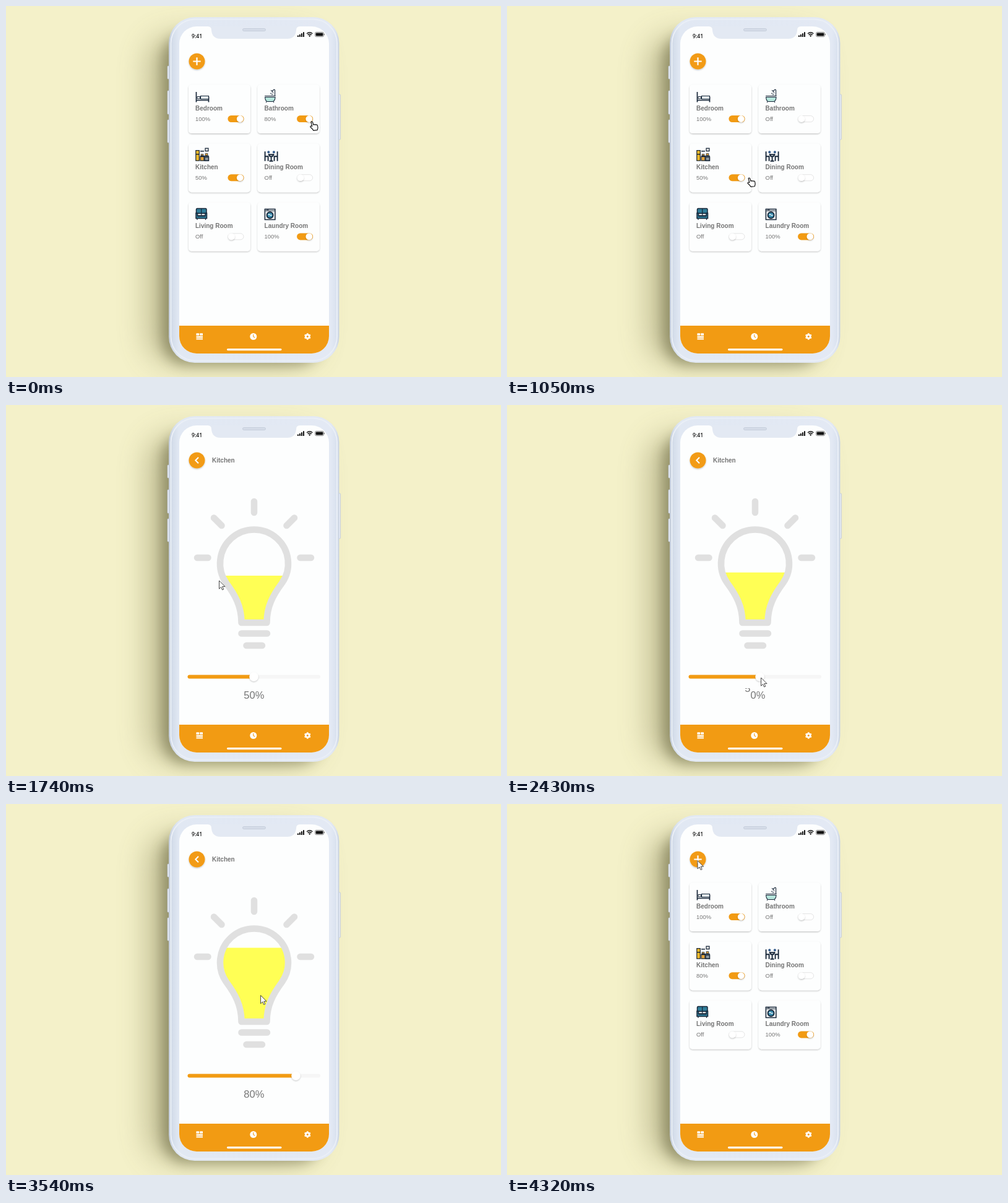
These frames come from a looping animation (800 by 600 pixels, 4350 ms). An HTML page:

```html
<!DOCTYPE html>
<html lang="en">
<head>
<meta charset="utf-8">
<title>Smart lighting</title>
<style>
  html, body { margin: 0; width: 100%; height: 100%; overflow: hidden; background: #f4f1c9; }
  svg { display: block; width: 800px; height: 600px; }
  text { font-family: "Liberation Sans", Arial, sans-serif; fill: #757575; }
  .title { font-size: 10px; font-weight: bold; }
  .value { font-size: 9.4px; }
  .big { font-size: 16.5px; }
</style>
</head>
<body>
<svg id="stage" viewBox="0 0 800 600" xmlns="http://www.w3.org/2000/svg">
  <defs>
    <linearGradient id="body">
      <stop offset="0" stop-color="#c3ccda"/><stop offset=".025" stop-color="#d5deeb"/>
      <stop offset=".06" stop-color="#e1e8f3"/><stop offset=".95" stop-color="#e3e9f4"/>
      <stop offset=".98" stop-color="#dbe3f0"/><stop offset="1" stop-color="#cbd4e2"/>
    </linearGradient>
    <filter id="wide" x="-50%" y="-20%" width="200%" height="140%"><feGaussianBlur stdDeviation="25"/></filter>
    <filter id="near" x="-50%" y="-20%" width="200%" height="140%"><feGaussianBlur stdDeviation="10"/></filter>
    <filter id="lift" x="-30%" y="-30%" width="160%" height="170%">
      <feDropShadow dx="0" dy="1.2" stdDeviation="1.3" flood-color="#000" flood-opacity=".24"/>
    </filter>
    <clipPath id="screenClip"><rect x="280" y="33" width="242" height="529" rx="28"/></clipPath>
    <clipPath id="digitClip"><rect x="380" y="458" width="16" height="23"/></clipPath>
    <path id="bulbShape" d="M380.5 352C380.5 325 370 307 356 288A55 55 0 1 1 446 288C432 307 421.500 325 421.500 352Z"/>
    <clipPath id="bulbClip"><use href="#bulbShape"/></clipPath>
  </defs>

  <rect width="800" height="600" fill="#f4f1c9"/>
  <rect x="230" y="50" width="270" height="525" rx="40" fill="#6f6c40" opacity=".42" filter="url(#wide)"/>
  <rect x="252" y="45" width="260" height="536" rx="40" fill="#55532f" opacity=".42" filter="url(#near)"/>

  <g fill="#e6ebf4" stroke="#b9c2d0" stroke-width=".7">
    <rect x="261" y="97" width="4" height="21" rx="1"/>
    <rect x="261" y="137" width="4" height="38" rx="1"/>
    <rect x="261" y="184" width="4" height="37" rx="1"/>
    <rect x="537" y="143" width="3.500" height="73" rx="1"/>
  </g>
  <rect x="263" y="18" width="275.500" height="559" rx="42" fill="url(#body)"/>
  <rect x="266.500" y="21.500" width="268.500" height="552" rx="39" fill="none" stroke="#eaeff7" stroke-width="2"/>
  <rect x="280" y="33" width="242" height="529" rx="28" fill="#fdfefe"/>
  <path d="M326 33Q332 33 332 39Q333 53 347 53H454Q468 53 469 39Q469 33 475 33Z" fill="#e3e9f3"/>
  <rect x="382.500" y="36.500" width="37" height="4" rx="2" fill="#d5dce8" stroke="#c0c9d7" stroke-width=".8"/>

  <text x="300" y="52" style="font:600 8.600px 'Open Sans','Noto Sans',sans-serif;fill:#111">9:41</text>
  <g fill="#111">
    <path d="M471 47.500h2v2.500h-2zM474 46h2v4h-2zM477 44.200h2v5.800h-2zM480 42.300h2v7.700h-2z"/>
    <rect x="500.600" y="43.500" width="11.800" height="5" rx="1"/>
    <rect x="499.500" y="42.300" width="14" height="7.400" rx="2" fill="none" stroke="#777" stroke-width=".8"/>
    <path d="M514 44.500q1.500 1.500 0 3z"/>
    <path d="M490.700 50l-1.700-1.900a2.600 2.600 0 0 1 3.400 0z"/>
    <path d="M486 44.700q4.700-3.900 9.400 0M487.600 46.700q3.100-2.500 6.200 0" fill="none" stroke="#111" stroke-width="1.400"/>
  </g>

  <circle cx="308.500" cy="89.500" r="13" fill="#f29b13" filter="url(#lift)"/>

  <g id="home">
    <path d="M308.500 83.300v12.400M302.300 89.500h12.400" stroke="#fff" stroke-width="2.200"/>
    <g id="cards"></g>
  </g>

  <g id="detail">
    <path d="M311 84.800l-4.700 4.700 4.700 4.700" fill="none" stroke="#fff" stroke-width="2"/>
    <text class="title" x="333" y="93">Kitchen</text>
    <rect id="liquid" x="340" width="122" fill="#ffff55" clip-path="url(#bulbClip)"/>
    <g fill="none" stroke="#e0e0e0" stroke-width="10.500" stroke-linecap="round" stroke-linejoin="round">
      <use href="#bulbShape"/>
      <path d="M380.500 369.500H422M388.500 389H414M401 156v18M336 182.500l12.500 12.500M466 182.500l-12.500 12.500M309 247h17.500M475.500 247H493"/>
    </g>
    <g stroke-width="6" stroke-linecap="round">
      <path d="M297 439.500H505" stroke="#f6f6f6"/>
      <path id="level" stroke="#f29b13"/>
    </g>
    <circle id="thumb" cy="439.500" r="7.200" fill="#fff" filter="url(#lift)"/>
    <g clip-path="url(#digitClip)"><g id="digits" class="big"></g></g>
    <text class="big" x="393.500" y="475">0%</text>
  </g>

  <g clip-path="url(#screenClip)"><rect x="280" y="517" width="242" height="45" fill="#f29b13"/></g>
  <g fill="#fff">
    <rect x="357" y="554" width="88.500" height="3.200" rx="1.600"/>
    <path d="M307.500 529.300h4.600v3.700h-4.600zM313.200 529.300h4.800v3.700h-4.800zM307.500 534h10.500v2.500h-10.500zM307.500 537.400h10.500v2.200h-10.500z"/>
    <circle cx="399.800" cy="534.500" r="5.500"/>
    <path d="M399.800 531v3.700l2.500 1.700" fill="none" stroke="#f29b13" stroke-width="1.100"/>
    <circle cx="487.300" cy="534.500" r="2.900" fill="none" stroke="#fff" stroke-width="2.600"/>
    <g id="teeth"></g>
  </g>

  <g id="cursor">
    <path id="arrow" d="M0 0V13.300L3.100 10.400 5.100 15 7.200 14.100 5.200 9.600H9.500Z" fill="#fff" stroke="#333" stroke-width=".9"/>
    <path id="hand" d="M-1.500 .8Q-.4-.9 1 .8L2.400 5.200Q3.600 4 4.800 5.200 6 4.200 7 5.300 8.500 4.700 9 6.400 10.300 10 8.600 13.700L2.500 14.300Q.5 11.200-2.600 8.700-2.800 6.700-.6 7.200L.2 7.600Z"
      fill="#fff" stroke="#111" stroke-width="1.200" stroke-linejoin="round"/>
  </g>
</svg>

<script>
const LOOP = 4350;
const $ = id => document.getElementById(id);
const clamp = v => Math.min(1, Math.max(0, v));
const smooth = u => u * u * (3 - 2 * u);
const mix = (a, b, u) => a + (b - a) * u;
const ramp = (t, from, to) => smooth(clamp((t - from) / (to - from)));
const set = (id, attrs) => { for (const k in attrs) $(id).setAttribute(k, attrs[k]); };

// Icons are drawn relative to the left edge of the label and the top of the card.
const ink = 'fill="none" stroke="#172638"';
const icons = {
  bed: `<path d="M1.500 12v16.500M1.500 25.500H21.500V28.500M21.500 26V20" ${ink} stroke-width="1.700"/>
    <path d="M3 19.500h4.500v3.500H3z" fill="#fff" ${ink.slice(12)} stroke-width="1"/>
    <path d="M8.500 18.500h13v5h-13z" fill="#e8f3f5" stroke="#172638" stroke-width="1.200"/>`,
  bath: `<path d="M.5 18.500H18M17 18V9.500Q17 7.500 15 8.500L12.500 10.500M10.500 9l4 4.500M11 13.500l-1 2M13 15l-1 2M3 27.500v1.800M15 27.500v1.800" ${ink} stroke-width="1.100"/>
    <path d="M1 20.500H17.500Q17 27.500 13 27.500H5Q1.500 27.500 1 20.500Z" fill="#b6e6dc" stroke="#172638" stroke-width="1.100"/>`,
  kitchen: `<path d="M.8 11.500h5.500v16.500H.8z" fill="#f7bc2a" stroke="#172638" stroke-width="1.200"/>
    <path d="M1 17.500h5M8 20.500H22M8 12.500h6" ${ink} stroke-width="1.500"/>
    <path d="M16 8h5v4.500h-5z" fill="#ddd" stroke="#172638" stroke-width="1.200"/>
    <path d="M8 21.500h6v6.500H8z" fill="#e9a63a" stroke="#172638" stroke-width="1.200"/>
    <path d="M15 22h6.500v6H15z" fill="#8c969d" stroke="#172638" stroke-width="1.500"/>
    <path d="M9 17.500h4v2H9zM16 16.500h4v3h-4z" fill="#e9a63a" stroke="#172638" stroke-width=".8"/>`,
  dining: `<path d="M1 13v15.500M1 21h5v7.500M21 13v15.500M21 21h-5v7.500M6.500 17l2.500 4H13l2.500-4M11 21v7M8 28.500h6M7 18h8" ${ink} stroke-width="1.900"/>
    <circle cx="6.700" cy="14" r="2" fill="#32598a"/><circle cx="15.300" cy="14" r="2" fill="#32598a"/>`,
  sofa: `<path d="M3 10h13.500q1.500 0 1.500 2v6H1.500v-6q0-2 1.500-2z" fill="#307d99" stroke="#172638" stroke-width="1.500"/>
    <path d="M1 17.500h2.500v4h12.500v-4h2.500v8.500H1z" fill="#307d99" stroke="#172638" stroke-width="1.500"/>
    <path d="M9.700 10v11M4 18h12M3 22.500h13.500M3 26v2.500M16.500 26v2.500" ${ink} stroke-width="1.200"/>`,
  washer: `<path d="M.8 11h16.500v17H.8z" fill="#f4f6f6" stroke="#172638" stroke-width="1.500"/>
    <path d="M1 13.800h16M3 12.400h4" ${ink} stroke-width="1"/>
    <circle cx="9" cy="20.800" r="5" fill="#3d8fb0" stroke="#172638" stroke-width="1.900"/>
    <path d="M6 20.500q1.500-1.500 3 0t3 0" fill="none" stroke="#fff" stroke-width="1.200"/>`
};

const rooms = [
  ['Bedroom', '100%', 'bed'], ['Bathroom', '80%', 'bath'],
  ['Kitchen', '50%', 'kitchen'], ['Dining Room', 'Off', 'dining'],
  ['Living Room', 'Off', 'sofa'], ['Laundry Room', '100%', 'washer']
];

$('cards').innerHTML = rooms.map(([name, value, icon], i) => {
  const x = 295 + (i % 2) * 111.6, y = 127 + (i >> 1) * 95.2;
  const on = value !== 'Off';
  return `<g transform="translate(${x} ${y})">
    <rect width="100" height="79" rx="5" fill="#fdfefe" filter="url(#lift)"/>
    <g transform="translate(11 0)">${icons[icon]}</g>
    <text class="title" x="11" y="42">${name}</text>
    <text class="value" x="11" y="59" id="value${i}">${value}</text>
    <rect x="64" y="50.500" width="25" height="10" rx="5" fill="#fff" stroke="#dedede" stroke-width=".8"/>
    <rect x="63.500" y="50" width="26" height="11" rx="5.500" fill="#f29b13" id="track${i}" opacity="${+on}"/>
    <circle cx="${on ? 83.3 : 69.3}" cy="55.500" r="5.400" fill="#fff" filter="url(#lift)" id="knob${i}"/>
  </g>`;
}).join('');

$('digits').innerHTML = [5, 6, 7, 8].map((d, i) =>
  `<text x="384.300" y="${475 + i * 32}">${d}</text>`).join('');

$('teeth').innerHTML = [0, 60, 120].map(a =>
  `<path d="M486 529.200h2.600v2h-2.600zM486 537.800h2.600v2h-2.600z" transform="rotate(${a} 487.300 534.500)"/>`).join('');

// Pointer stops: time, x, y.
const easeIn = u => u * u, easeOut = u => u * (2 - u);
const stops = [
  [0, 494.5, 187], [520, 494.5, 187], [1050, 392, 278, easeIn], [1320, 344.5, 284, easeOut],
  [1740, 344.5, 284], [2330, 402.5, 441], [2800, 470.5, 441], [3000, 475.5, 452],
  [3250, 475.5, 452], [3920, 316.5, 97.5], [4180, 316.5, 97.5], [4310, 308, 91.5], [LOOP, 308, 91.5]
];

function pointerAt(t) {
  const i = Math.max(1, stops.findIndex(s => s[0] > t));
  const [t0, x0, y0] = stops[i - 1], [t1, x1, y1, ease = smooth] = stops[i];
  const u = ease((t - t0) / (t1 - t0));
  return [mix(x0, x1, u), mix(y0, y1, u)];
}

function isLink(x, y, onDetail) {
  if (onDetail) return Math.hypot(x - 308.5, y - 89.5) < 13;
  const toggle = x > 470 && x < 498 && y > 176 && y < 190;
  const card = x > 295 && x < 395 && y > 222 && y < 301;
  return toggle || card;
}

function draw(t) {
  const off = ramp(t, 250, 450);
  set('knob1', { cx: mix(83.3, 69.3, off) });
  set('track1', { opacity: 1 - off });
  $('value1').textContent = off < .5 ? '80%' : 'Off';
  $('value2').textContent = t < 2600 ? '50%' : '80%';

  const detail = ramp(t, 1430, 1650) - ramp(t, 4130, 4290);
  set('home', { opacity: 1 - detail });
  set('detail', { opacity: detail });

  const drag = ramp(t, 2330, 2800);
  const thumb = mix(400.5, 468.5, drag), top = mix(276, 232.5, drag);
  set('thumb', { cx: thumb });
  set('level', { d: `M296.500 439.500H${thumb}` });
  set('liquid', { y: top, height: 347.5 - top });
  set('digits', { transform: `translate(0 ${-96 * drag})` });

  const [x, y] = pointerAt(t), link = isLink(x, y, detail > .5);
  set('cursor', { transform: `translate(${x} ${y})` });
  set('hand', { visibility: link ? 'visible' : 'hidden' });
  set('arrow', { visibility: link ? 'hidden' : 'visible' });
}

const start = performance.now();
function tick() {
  draw((performance.now() - start) % LOOP);
  requestAnimationFrame(tick);
}
tick();
</script>
</body>
</html>
```
